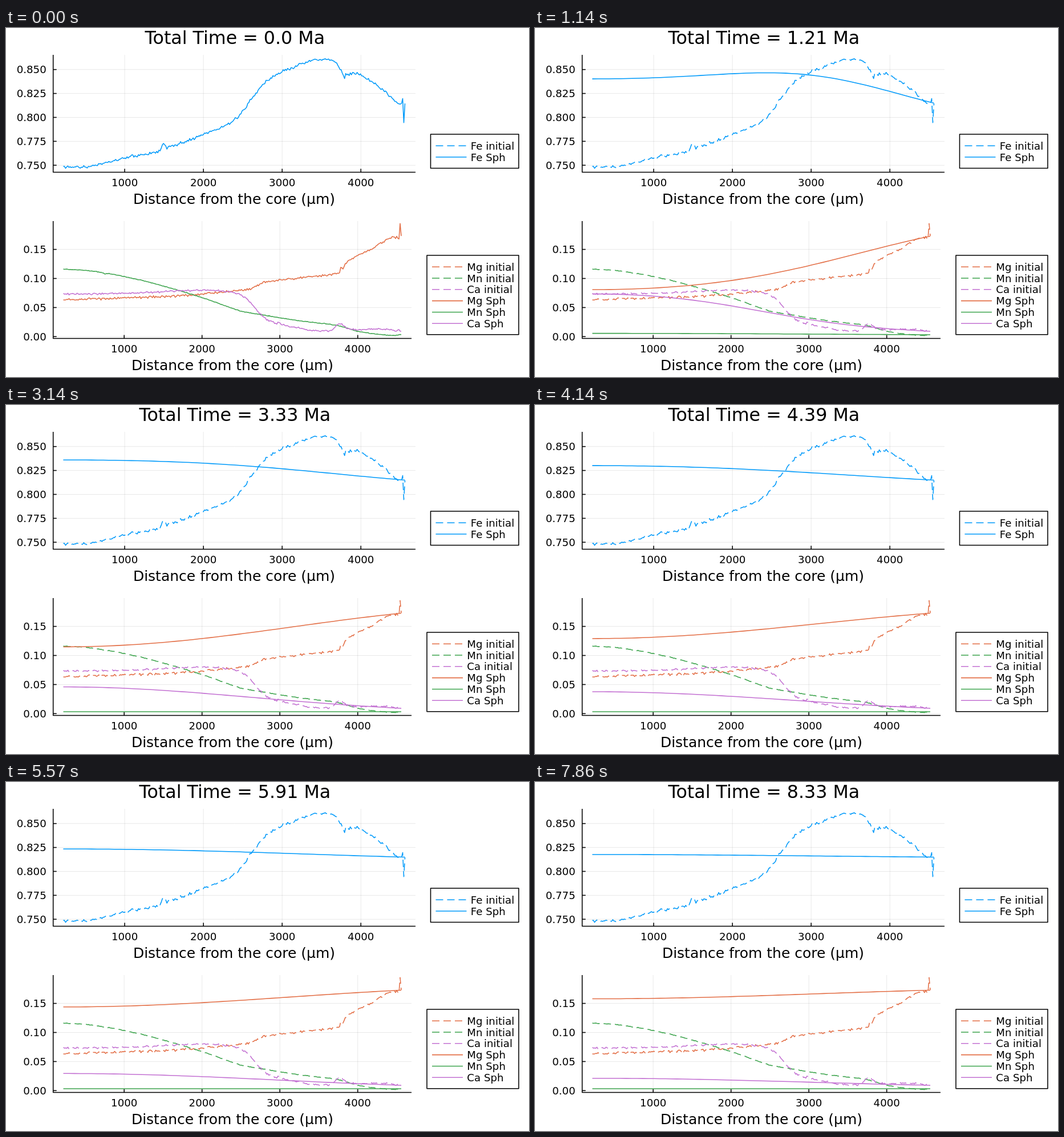
Write an HTML page with a canvas that moves like this. It is 917x611 px and loops after 8 s.

```html
<!DOCTYPE html>
<html lang="en">
<head>
<meta charset="utf-8">
<title>Garnet diffusion profiles</title>
<style>
  html, body { margin: 0; height: 100%; overflow: hidden; background: #fff; }
  canvas { display: block; }
</style>
</head>
<body>
<canvas id="stage" width="917" height="611"></canvas>
<script>
const ctx = document.getElementById('stage').getContext('2d');
const BLUE = '#009afa', ORANGE = '#e36f47', GREEN = '#3ea44e', PURPLE = '#c371d2';
const FRAMES = 56, LOOP = 8000;

// Plot geometry: x = x0 + perUm * distance, y = y0 - scale * (value - base)
const TOP = { left: 82.7, right: 718, top: 47, bottom: 252.5, x0: 70.05, perUm: 0.13805,
  y0: 240.3, base: 0.75, scale: 1676, tickStep: 0.025, tickCount: 5, digits: 3,
  first: 100.4, last: 699.5, labelX: 400 };
const LOW = { left: 82.7, right: 711, top: 338, bottom: 543.5, x0: 70.7, perUm: 0.1365,
  y0: 540.3, base: 0, scale: 1018, tickStep: 0.05, tickCount: 4, digits: 2,
  first: 100.5, last: 693, labelX: 397 };
const toY = (plot, value) => plot.y0 - plot.scale * (value - plot.base);

// Smooth curve through a few "x,y" stage points
function smooth(text) {
  const keys = text.split(' ').map(pair => pair.split(',').map(Number));
  const end = keys.length - 1;
  const slope = i => {
    const [ax, ay] = keys[Math.max(i - 1, 0)], [bx, by] = keys[Math.min(i + 1, end)];
    return (by - ay) / (bx - ax);
  };
  return x => {
    let i = 0;
    while (i < end - 1 && keys[i + 1][0] < x) i++;
    const [ax, ay] = keys[i], [bx, by] = keys[i + 1];
    const w = bx - ax, t = (x - ax) / w, s = 1 - t;
    return s * s * ((1 + 2 * t) * ay + t * w * slope(i)) +
           t * t * ((1 + 2 * s) * by - s * w * slope(i + 1));
  };
}

const bump = (at, height, width) => x => height * Math.exp(-(((x - at) / width) ** 2));

const iron = smooth('100.4,244 150,242 208,227.5 262,217 346,186 404,158 436,117 460,90 ' +
  '500,70 554,54.5 580,61 590,79 617,80 660,107 690,133 699.5,131.5');
const magnesium = smooth('100.5,476 200,473 300,469 384,462 430,455.5 450,446 510,438 ' +
  '585,427 600,408 640,387 672,369 693,364.5');
const manganese = smooth('100.5,422 150,425.5 207,435 262,448 344,472 410,495 445,501.5 ' +
  '517,513 580,520.5 617,531 672,538 693,537');
const calcium = smooth('100.5,466 230,464 346,459 404,464.5 425,477 447,502 465,514 ' +
  '520,526.5 545,530 572,528.5 584,517 600,527 660,527 693,531');

function randomizer(seed) {
  return () => {
    seed = (seed * 1664525 + 1013904223) % 4294967296;
    return seed / 4294967296;
  };
}

// A measured profile: smooth trend, local spikes and scatter
function measure(plot, trend, scatter, seed, bumps = []) {
  const random = randomizer(seed), count = Math.round((plot.last - plot.first) / 2);
  return Array.from({ length: count + 1 }, (_, i) => {
    const x = plot.first + (plot.last - plot.first) * i / count;
    const noise = i < count ? (random() + random() - 1) * scatter : 0;
    return [x, trend(x) + noise + bumps.reduce((sum, b) => sum + b(x), 0)];
  });
}

const ironStart = measure(TOP, iron, 3.2, 11,
  [bump(276, -12, 3), bump(593, 11, 1.5), bump(695.5, -9, 1), bump(697.5, 34, 1)]);
const lowStart = [
  measure(LOW, magnesium, 2.6, 5, [bump(588, -9, 1.5), bump(688, 5, 2), bump(691, -24, 1)]),
  measure(LOW, manganese, 0.7, 7, [bump(174, 1.5, 3)]),
  measure(LOW, calcium, 2, 9, [bump(478, -3, 2), bump(688, -3, 2)])];

// Multicomponent diffusion in a sphere; the fourth component (Fe) is the remainder
const CELLS = 60, SUBSTEPS = 800;
const FE_RATE = 0.00629;
const [dMg, dMn, dCa] = [0.675, 7.5, 0.505].map(ratio => ratio * FE_RATE);

function simulate() {
  const dx = 1 / CELLS, dt = 1 / SUBSTEPS;
  const state = [magnesium, manganese, calcium].map(trend =>
    Array.from({ length: CELLS + 1 }, (_, i) =>
      (LOW.y0 - trend(LOW.first + (LOW.last - LOW.first) * i / CELLS)) / LOW.scale));
  const [mg, mn, ca] = state;
  const areas = Array.from({ length: CELLS }, (_, i) => ((i + 0.5) * dx) ** 2);
  const factors = areas.map((a, i) => 3 * dt / (a ** 1.5 - (i ? areas[i - 1] ** 1.5 : 0)));
  const snapshot = () => state.map(values => values.slice());
  const history = [snapshot()];

  while (history.length < FRAMES) {
    for (let step = 0; step < SUBSTEPS; step++) {
      let inMg = 0, inMn = 0, inCa = 0;
      for (let i = 0; i < CELLS; i++) {
        const gMg = (mg[i + 1] - mg[i]) / dx, xMg = (mg[i + 1] + mg[i]) / 2;
        const gMn = (mn[i + 1] - mn[i]) / dx, xMn = (mn[i + 1] + mn[i]) / 2;
        const gCa = (ca[i + 1] - ca[i]) / dx, xCa = (ca[i + 1] + ca[i]) / 2;
        const total = FE_RATE * (1 - xMg - xMn - xCa) + dMg * xMg + dMn * xMn + dCa * xCa;
        const drag = ((dMg - FE_RATE) * gMg + (dMn - FE_RATE) * gMn + (dCa - FE_RATE) * gCa) / total;
        const outMg = areas[i] * dMg * (gMg - xMg * drag);
        const outMn = areas[i] * dMn * (gMn - xMn * drag);
        const outCa = areas[i] * dCa * (gCa - xCa * drag);
        mg[i] += factors[i] * (outMg - inMg);
        mn[i] += factors[i] * (outMn - inMn);
        ca[i] += factors[i] * (outCa - inCa);
        inMg = outMg; inMn = outMn; inCa = outCa;
      }
    }
    history.push(snapshot());
  }
  return history;
}
const history = simulate();

function line(points, color, width = 1.55, dashed = false) {
  ctx.beginPath();
  points.forEach(([x, y]) => ctx.lineTo(x, y));
  ctx.strokeStyle = color;
  ctx.lineWidth = width;
  ctx.lineJoin = 'round';
  ctx.setLineDash(dashed ? [13, 7] : []);
  ctx.stroke();
}

function text(string, x, y, size, align = 'center') {
  ctx.font = `${size}px "DejaVu Sans", sans-serif`;
  ctx.textAlign = align;
  ctx.fillStyle = '#000';
  ctx.fillText(string, x, y);
}

function drawAxes(plot) {
  const { left, right, top, bottom } = plot;
  const grid = 'rgba(0,0,0,0.1)';
  for (let um = 1000; um <= 4000; um += 1000) {
    const x = plot.x0 + plot.perUm * um;
    line([[x, top], [x, bottom]], grid, 0.9);
    line([[x, bottom], [x, bottom - 6]], '#000');
    text(um, x, bottom + 24.3, 18.2);
  }
  for (let i = 0; i < plot.tickCount; i++) {
    const value = plot.base + i * plot.tickStep, y = toY(plot, value);
    line([[left, y], [right, y]], grid, 0.9);
    line([[left, y], [left + 6, y]], '#000');
    text(value.toFixed(plot.digits), 70.7, y + 6.6, 18.2, 'right');
  }
  line([[left, top], [left, bottom], [right, bottom]], '#000');
  text('Distance from the core (µm)', plot.labelX, bottom + 55.2, 25);
}

function drawLegend(x, y, width, height, entries) {
  ctx.setLineDash([]);
  ctx.strokeStyle = '#000';
  ctx.lineWidth = 1.55;
  ctx.strokeRect(x, y, width, height);
  entries.forEach(([label, color, dashed], i) => {
    const rowY = y + 20.2 + i * 19.8;
    line([[x + 9, rowY], [x + 63, rowY]], color, 1.55, dashed);
    text(label, x + 70.3, rowY + 6.6, 18.2, 'left');
  });
}

const spread = (plot, values) => values.map((v, i) =>
  [plot.first + (plot.last - plot.first) * i / CELLS, toY(plot, v)]);

function titleFor(frame) {
  const age = Math.round(frame * 1500 / 99) / 100;
  return `Total Time = ${Number.isInteger(age) ? age.toFixed(1) : age} Ma`;
}

function draw(frame) {
  ctx.fillStyle = '#fff';
  ctx.fillRect(0, 0, 917, 611);
  drawAxes(TOP);
  drawAxes(LOW);
  text(titleFor(frame), 401.3, 27.6, 31.7);

  const [mg, mn, ca] = history[frame];
  const colors = [ORANGE, GREEN, PURPLE];
  const dashed = frame > 0;
  line(ironStart, BLUE, 1.55, dashed);
  lowStart.forEach((curve, i) => line(curve, colors[i], 1.55, dashed));
  if (frame > 0) {
    line(spread(TOP, mg.map((v, i) => 1 - v - mn[i] - ca[i])), BLUE);
    history[frame].forEach((values, i) => line(spread(LOW, values), colors[i]));
  }

  drawLegend(744.5, 186, 154.5, 59.5, [['Fe initial', BLUE, true], ['Fe Sph', BLUE]]);
  drawLegend(738, 398, 161, 138.7, [
    ['Mg initial', ORANGE, true], ['Mn initial', GREEN, true], ['Ca initial', PURPLE, true],
    ['Mg Sph', ORANGE], ['Mn Sph', GREEN], ['Ca Sph', PURPLE]]);
}

// Frame starts fall on whole hundredths of a second
const startOf = frame => Math.round(frame * LOOP / FRAMES / 10) * 10;
const origin = performance.now();
let shown = -1;

function tick() {
  const time = (performance.now() - origin) % LOOP;
  let frame = FRAMES - 1;
  while (startOf(frame) > time) frame--;
  if (frame !== shown) draw(shown = frame);
  requestAnimationFrame(tick);
}
tick();
</script>
</body>
</html>
```
